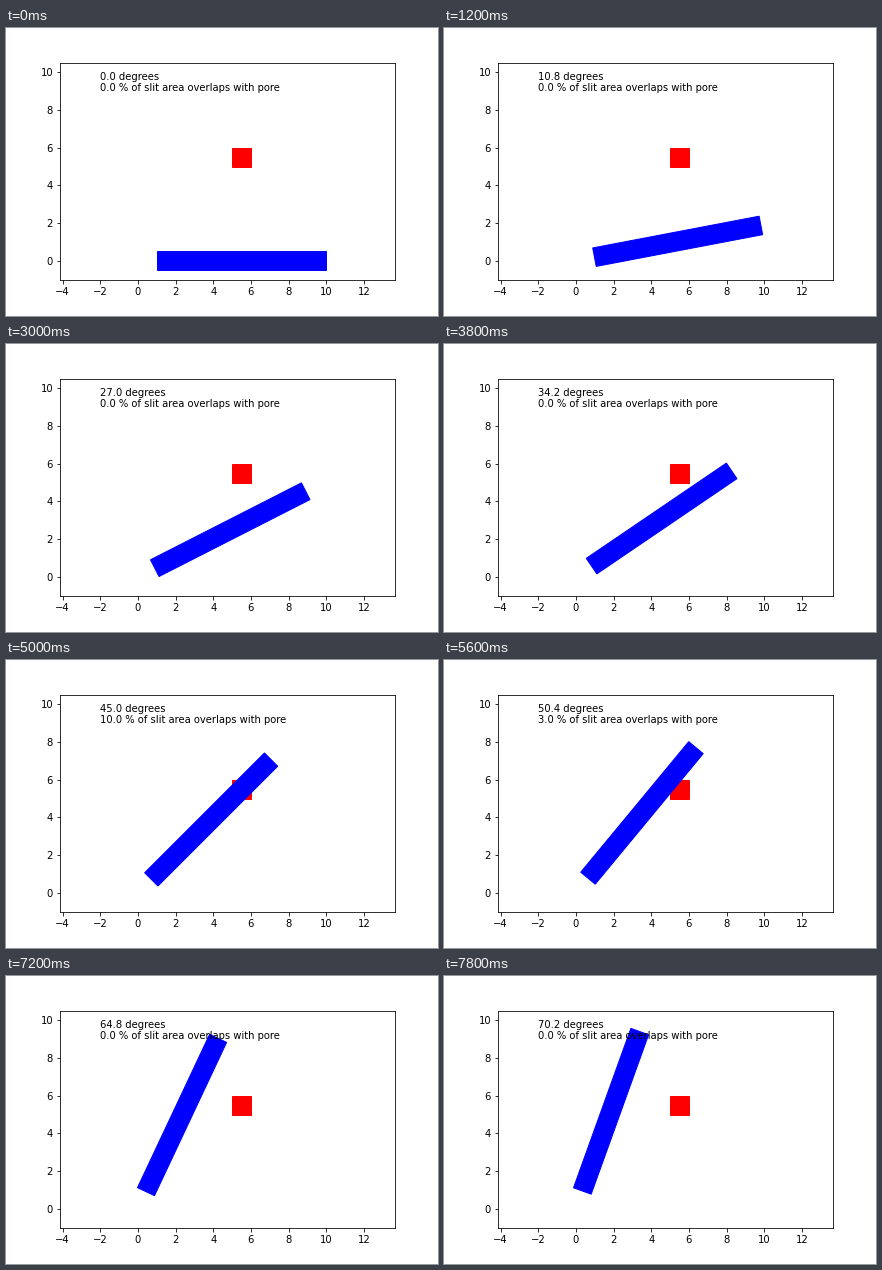
Recreate the animation shown at these times as a matplotlib script. Size 432 by 288 pixels, loop 8 s.

```python
import numpy as np
import matplotlib.pyplot as plt
from matplotlib.animation import FuncAnimation

FRAMES = 40
INTERVAL = 200
STEP = 1.8  # degrees per frame

SLIT = np.array([(1, -0.5), (10, -0.5), (10, 0.5), (1, 0.5)])
PORE = np.array([(5, 5), (6, 5), (6, 6), (5, 6)], float)


def rotate(points, degrees):
    a = np.radians(degrees)
    c, s = np.cos(a), np.sin(a)
    return points @ np.array([(c, s), (-s, c)])


def clip(points, axis, limit, sign):
    """Keep the part of a polygon where sign * (coordinate - limit) >= 0."""
    kept = []
    for p, q in zip(points, points[1:] + points[:1]):
        dp, dq = sign * (p[axis] - limit), sign * (q[axis] - limit)
        if dp >= 0:
            kept.append(p)
        if dp * dq < 0:
            kept.append(p + (q - p) * dp / (dp - dq))
    return kept


def area(points):
    if len(points) < 3:
        return 0.0
    x, y = np.array(points).T
    return 0.5 * abs(np.dot(x, np.roll(y, -1)) - np.dot(y, np.roll(x, -1)))


def overlap_percent(slit):
    part = list(slit)
    for axis in (0, 1):
        part = clip(part, axis, PORE[:, axis].min(), 1)
        part = clip(part, axis, PORE[:, axis].max(), -1)
    return round(100 * area(part) / area(slit))


fig = plt.figure(figsize=(6, 4), dpi=72, facecolor="white")
ax = fig.add_axes([0.125, 0.125, 0.775, 0.755])

# Equal scale on both axes, centred on the swept area
y_low, y_high = -1.025, 10.525
half_width = 0.5 * (y_high - y_low) * (0.775 * 6) / (0.755 * 4)
ax.set_xlim(4.75 - half_width, 4.75 + half_width)
ax.set_ylim(y_low, y_high)
ax.set_xticks(range(-4, 13, 2))
ax.set_yticks(range(0, 11, 2))

ax.add_patch(plt.Polygon(PORE, color="red", lw=1))
bar = ax.add_patch(plt.Polygon(SLIT, color="blue", lw=1))
label = ax.text(-2, 9, "", fontsize=10)


def update(i):
    angle = i * STEP
    slit = rotate(SLIT, angle)
    bar.set_xy(slit)
    label.set_text(
        f"{angle:.1f} degrees\n"
        f"{overlap_percent(slit):.1f} % of slit area overlaps with pore"
    )
    return bar, label


anim = FuncAnimation(fig, update, frames=FRAMES, interval=INTERVAL,
                     repeat=True, repeat_delay=0)
plt.show()
```
